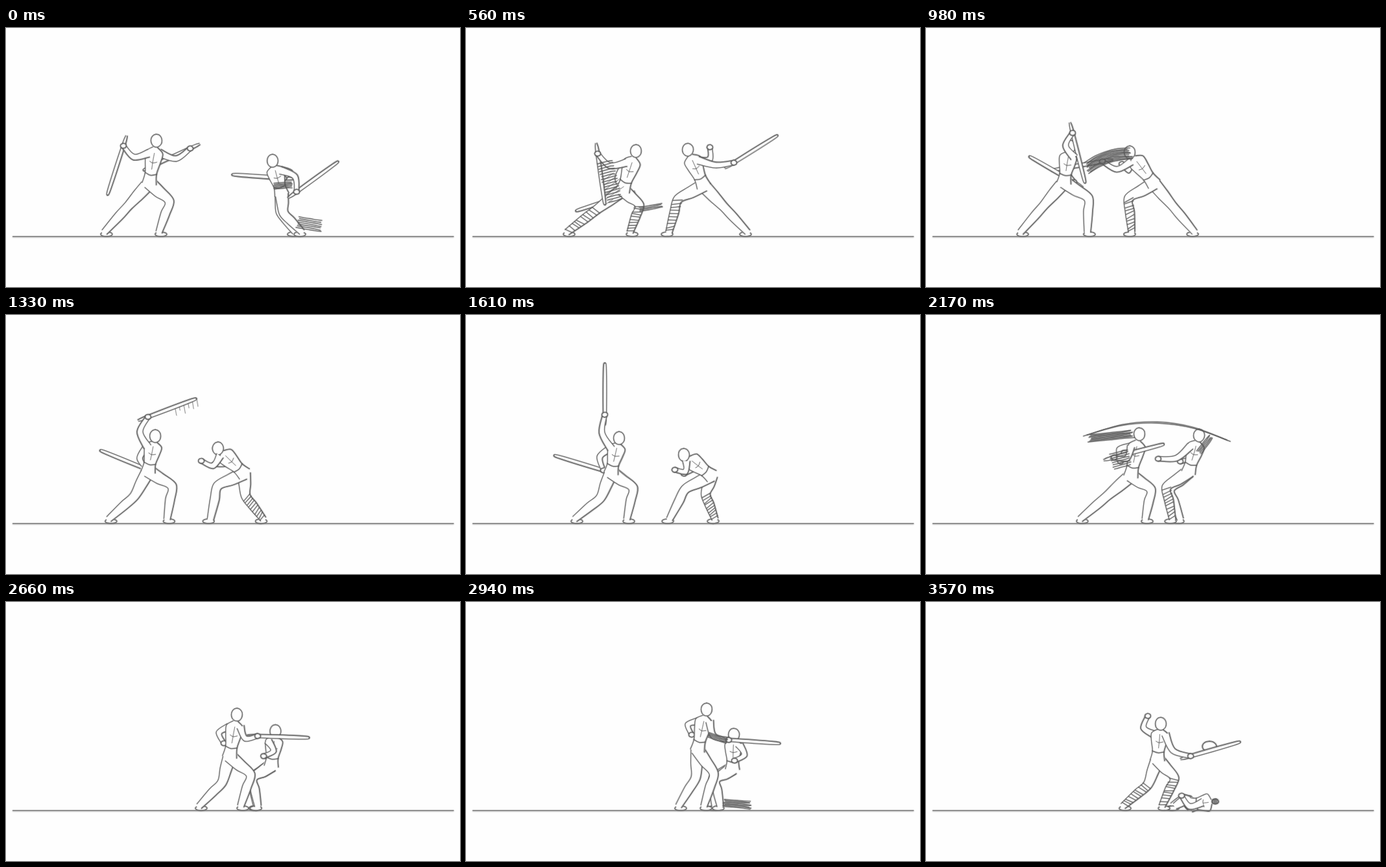
An HTML page with a canvas for the animation above (3640 ms loop, 700 by 400 pixels).

```html
<!DOCTYPE html>
<html lang="en">
<head>
<meta charset="utf-8">
<title>Sword duel sketch</title>
<style>
html, body { margin: 0; width: 100%; height: 100%; overflow: hidden; background: #fefefe; }
canvas { display: block; width: 700px; height: 400px; }
</style>
</head>
<body>
<canvas id="stage" width="700" height="400"></canvas>
<script>
const ctx = document.getElementById('stage').getContext('2d');
const LOOP = 3640, STEP = 70, GROUND = 322;
const INK = '#585858', PAPER = '#fefefe';

// Runs of [start, steps]; the picture holds in the gaps between them.
const runs = [[0, 1], [140, 9], [840, 24], [2660, 5], [3080, 1], [3290, 5]];
const ticks = runs.flatMap(([start, n]) => Array.from({ length: n }, (_, i) => start + i * STEP));

// Feet are x positions on the ground; shaded lists the hatched shins.
const pose = (time, head, hip, hands, feet, blades, shaded = []) =>
  ({ time, head, hip, hands, feet, blades, shaded });

const left = {
  facing: 1,
  bladeEnds: [LOOP, 1900],
  poses: [
    pose(0, [232, 174], [221, 239], [[181, 182], [284, 186]], [152, 236], [108, 155]),
    pose(350, [248, 176], [232, 244], [[222, 163], [256, 226]], [153, 246], [262, 150]),
    pose(560, [262, 190], [242, 250], [[203, 194], [245, 258]], [156, 253], [442, 162], [0, 1]),
    pose(980, [222, 183], [213, 238], [[226, 162], [228, 238]], [146, 249], [436, 210]),
    pose(1610, [236, 190], [224, 243], [[214, 154], [212, 240]], [168, 248], [270, 197]),
    pose(2170, [329, 184], [316, 248], [[290, 220], [300, 226]], [238, 338], [345, 190]),
    pose(2660, [356, 174], [345, 238], [[388, 207], [336, 218]], [298, 362], [362, 190]),
    pose(2940, [371, 166], [357, 228], [[405, 213], [348, 205]], [328, 367], [364, 190]),
    pose(3080, [370, 167], [357, 229], [[405, 213], [347, 206]], [328, 367], [364, 190]),
    pose(3570, [362, 188], [357, 243], [[408, 238], [342, 176]], [304, 364], [344, 190], [0, 1])
  ]
};

const right = {
  facing: -1,
  bladeEnds: [1100, 210],
  headLost: 3290,
  poses: [
    pose(0, [411, 205], [425, 256], [[448, 253], [428, 232]], [446, 456], [324, 184]),
    pose(350, [380, 194], [402, 248], [[434, 210], [392, 215]], [442, 390], [300, 200]),
    pose(560, [342, 188], [366, 243], [[413, 208], [376, 184]], [434, 313], [328, 220], [1]),
    pose(980, [314, 192], [351, 240], [[272, 206], [302, 210]], [414, 317], [170, 220], [1]),
    pose(1610, [336, 216], [378, 248], [[322, 239], [336, 245]], [384, 314], [170, 220], [0]),
    pose(2170, [421, 186], [405, 242], [[358, 222], [392, 226]], [392, 380], [170, 220], [1]),
    pose(2940, [413, 205], [411, 257], [[414, 245], [408, 244]], [384, 392], [170, 220]),
    pose(3080, [413, 206], [411, 258], [[414, 245], [408, 244]], [384, 392], [170, 220]),
    pose(3570, [446, 308], [410, 313], [[394, 299], [406, 303]], [380, 384], [170, 220])
  ]
};

// Loose hatching that accents a pose.
const scribbles = [
  { at: 0, x: 468, y: 303, long: 36, thick: 17, tilt: 10, lines: 7 },
  { at: 0, x: 427, y: 243, long: 27, thick: 9, tilt: -6, lines: 6 },
  { at: 560, x: 222, y: 237, long: 22, thick: 62, tilt: -15, lines: 16 },
  { at: 560, x: 285, y: 277, long: 35, thick: 6, tilt: -10, lines: 4 },
  { at: 980, x: 282, y: 205, long: 68, thick: 18, tilt: -18, bow: 6, lines: 12 },
  { at: 2170, x: 356, y: 190, long: 206, thick: 2, tilt: 2, bow: 24, lines: 2 },
  { at: 2170, x: 285, y: 187, long: 66, thick: 11, tilt: -6, lines: 9 },
  { at: 2170, x: 300, y: 223, long: 28, thick: 24, tilt: -15, lines: 8 },
  { at: 2170, x: 430, y: 200, long: 30, thick: 8, tilt: -52, lines: 5 },
  { at: 2940, x: 418, y: 312, long: 40, thick: 11, tilt: 5, lines: 8 },
  { at: 2940, x: 388, y: 210, long: 30, thick: 7, tilt: 20, lines: 5 }
];

const mix = (a, b, k) => a + (b - a) * k;
const between = (p, q, k) => [mix(p[0], q[0], k), mix(p[1], q[1], k)];
const gap = (p, q) => Math.hypot(q[0] - p[0], q[1] - p[1]);
const ease = k => k * k * (3 - 2 * k);

let seed = 1;
function jitter(size) {
  seed = (seed * 16807) % 2147483647;
  return (seed / 2147483647 - 0.5) * 2 * size;
}

function trace(points, closed) {
  ctx.beginPath();
  ctx.moveTo(...points[0]);
  for (let i = 0; i + 1 < points.length; i++) {
    const a = points[i - 1] || points[i], b = points[i], c = points[i + 1], d = points[i + 2] || c;
    ctx.bezierCurveTo(b[0] + (c[0] - a[0]) / 6, b[1] + (c[1] - a[1]) / 6,
      c[0] - (d[0] - b[0]) / 6, c[1] - (d[1] - b[1]) / 6, ...c);
  }
  if (closed) ctx.closePath();
}

// A soft halo, the line itself and a looser second pass.
function pencil(points, width = 1.3) {
  const loose = points.map(([x, y]) => [x + jitter(0.9), y + jitter(0.9)]);
  for (const [path, w, alpha] of [[points, width * 2.4, 0.1], [points, width, 0.75], [loose, width * 0.6, 0.45]]) {
    ctx.globalAlpha = alpha;
    ctx.lineWidth = w;
    trace(path);
    ctx.stroke();
  }
  ctx.globalAlpha = 1;
}

function fill(points) {
  ctx.fillStyle = PAPER;
  trace(points, true);
  ctx.fill();
}

function oval([x, y], rx, ry, width) {
  const points = Array.from({ length: 13 }, (_, i) =>
    [x + rx * Math.sin(i * Math.PI / 6), y - ry * Math.cos(i * Math.PI / 6)]);
  fill(points);
  pencil(points, width);
}

// The two outlines of a limb running through the points.
function edges(points, widths) {
  const side = s => points.map((p, i) => {
    const a = points[Math.max(0, i - 1)], b = points[Math.min(points.length - 1, i + 1)], d = gap(a, b) || 1;
    return [p[0] + (b[1] - a[1]) / d * widths[i] * s, p[1] - (b[0] - a[0]) / d * widths[i] * s];
  });
  return [side(1), side(-1)];
}

function limb(points, widths) {
  const [front, back] = edges(points, widths);
  fill([...front, ...back.slice().reverse()]);
  pencil(front, 1.8);
  pencil(back, 1.3);
}

function hatchAcross([a1, a2], [b1, b2], lines) {
  for (let i = 0; i < lines; i++) {
    const k = i / lines;
    pencil([between(a1, a2, k + jitter(0.02)), between(b1, b2, k + 0.08 + jitter(0.03))]);
  }
}

function scribble({ x, y, long, thick, tilt, bow = 0, lines }) {
  ctx.save();
  ctx.translate(x, y);
  ctx.rotate(tilt * Math.PI / 180);
  for (let i = 0; i < lines; i++) {
    const row = (i / (lines - 1) - 0.5) * thick, end = long * (0.5 + jitter(0.05));
    pencil([[-end, row], [-end / 2, row - bow * 0.75], [jitter(2), row - bow], [end / 2, row - bow * 0.75], [end, row + jitter(1)]], 1.4);
  }
  ctx.restore();
}

// Middle joint of a two-bone limb, bent to one side by at most maxBend.
function bendJoint(a, b, upper, lower, side, maxBend) {
  const d = gap(a, b) || 1;
  const along = Math.max(d * 0.35, (upper * upper - lower * lower + d * d) / (2 * d));
  const out = side * Math.min(maxBend, Math.sqrt(Math.max(0, upper * upper - along * along)));
  const [ux, uy] = [(b[0] - a[0]) / d, (b[1] - a[1]) / d];
  return [a[0] + ux * along + uy * out, a[1] + uy * along - ux * out];
}

function skeletonAt({ poses, facing }, time) {
  const next = poses.find(p => p.time > time) || poses[poses.length - 1];
  const last = poses[poses.indexOf(next) - 1];
  const k = ease((time - last.time) / (next.time - last.time));
  const head = between(last.head, next.head, k), hip = between(last.hip, next.hip, k);
  const chest = between(head, hip, 0.3);
  const hands = last.hands.map((p, i) => between(p, next.hands[i], k));
  const feet = last.feet.map((x, i) => [mix(x, next.feet[i], k), GROUND - 7]);
  const shoulders = hands.map(p => [chest[0] + Math.sign(p[0] - chest[0]) * 9, chest[1]]);
  const tips = hands.map(([x, y], i) => {
    const angle = mix(last.blades[i], next.blades[i], k) * Math.PI / 180;
    return [x + 80 * Math.cos(angle), y + 80 * Math.sin(angle)];
  });
  // Elbows hang down and back; the leading knee bends more than the trailing one.
  const elbows = hands.map((p, i) => {
    const s = shoulders[i], hang = -facing * (p[1] - s[1]) - (p[0] - s[0]);
    return bendJoint(s, p, 28, 28, Math.sign(hang), 12);
  });
  const knees = feet.map(p => {
    const leading = (p[0] - hip[0]) * facing > 0;
    return bendJoint(hip, p, 45, 52, facing, leading ? Math.min(26, gap(hip, p) * 0.32) : 11);
  });
  return { head, hip, chest, hands, feet, shoulders, tips, elbows, knees, shaded: (k < 0.5 ? last : next).shaded };
}

function drawBlade(hand, tip, oldHand, oldTip) {
  if (gap(tip, oldTip) > 22) {
    for (let k = 0.55; k < 1; k += 0.09) {
      const now = between(hand, tip, k), old = between(oldHand, oldTip, k);
      pencil([now, between(now, old, 0.4 + jitter(0.2))], 0.7);
    }
  }
  limb([between(hand, tip, -0.2), hand, between(hand, tip, 0.88), tip], [1.2, 2.6, 2.4, 0.2]);
}

function drawFighter(fighter, time) {
  const now = skeletonAt(fighter, time), old = skeletonAt(fighter, Math.max(0, time - STEP));
  const { head, hip, chest } = now;

  const drawArm = i => {
    const hand = now.hands[i];
    if (time < fighter.bladeEnds[i]) drawBlade(hand, now.tips[i], old.hands[i], old.tips[i]);
    limb([now.shoulders[i], now.elbows[i], hand], [6, 4.5, 3.5]);
    oval(hand, 4.5, 3.8, 1.7);
  };
  const drawLeg = i => {
    const knee = now.knees[i], [x, y] = now.feet[i];
    oval([x + 3 * fighter.facing, y + 3.5], 9, 3.5, 1.6);
    limb([hip, between(hip, knee, 0.5), knee, between(knee, [x, y], 0.4), [x, y]], [10, 9, 7, 7, 5]);
    if (now.shaded.includes(i)) hatchAcross(...edges([knee, [x, y]], [7, 5]), 10);
  };

  drawArm(1);
  drawLeg(0);
  drawLeg(1);
  const spine = k => between(head, hip, k);
  const widths = [4, 13, 12, 9, 11];
  const trunk = [0.16, 0.28, 0.5, 0.78, 1.02].map(spine);
  limb(trunk, widths);
  const [front, back] = edges(trunk, widths);
  pencil([front[3], spine(0.82), back[3]], 1.5);
  pencil([between(front[2], back[2], 0.25), spine(0.53), between(front[2], back[2], 0.7)], 0.9);
  pencil([chest, spine(0.48), spine(0.68)], 0.8);

  if (time >= fighter.headLost) {
    oval(head, 5, 4, 2);
    hatchAcross(...edges([[head[0] - 4, head[1]], [head[0] + 4, head[1]]], [3, 3]), 5);
    const k = (time - fighter.headLost) / (LOOP - STEP - fighter.headLost);
    oval([mix(413, 437, k), mix(205, 223, k) - 40 * k * (1 - k)], 11, 8, 1.9);
  } else {
    oval(head, 8.5, 10, 1.5);
  }
  drawArm(0);
}

function drawGround() {
  ctx.save();
  ctx.shadowColor = 'rgba(0,0,0,.3)';
  ctx.shadowBlur = 2;
  ctx.shadowOffsetY = 1;
  ctx.strokeStyle = '#777';
  ctx.lineWidth = 1.5;
  ctx.beginPath();
  ctx.moveTo(10.5, GROUND);
  ctx.lineTo(690, GROUND);
  ctx.stroke();
  ctx.restore();
}

function drawAt(time) {
  seed = 1 + time * 17;
  ctx.fillStyle = PAPER;
  ctx.fillRect(0, 0, 700, 400);
  ctx.lineCap = ctx.lineJoin = 'round';
  ctx.strokeStyle = INK;
  drawFighter(right, time);
  drawFighter(left, time);
  scribbles.filter(s => Math.abs(s.at - time) <= STEP).forEach(scribble);
  drawGround();
}

const start = performance.now();
let shown = 0;
function play(now) {
  const time = Math.max(0, now - start) % LOOP;
  const tick = ticks.filter(t => t <= time).pop();
  if (tick !== shown) drawAt(shown = tick);
  requestAnimationFrame(play);
}
drawAt(shown);
requestAnimationFrame(play);
</script>
</body>
</html>
```
